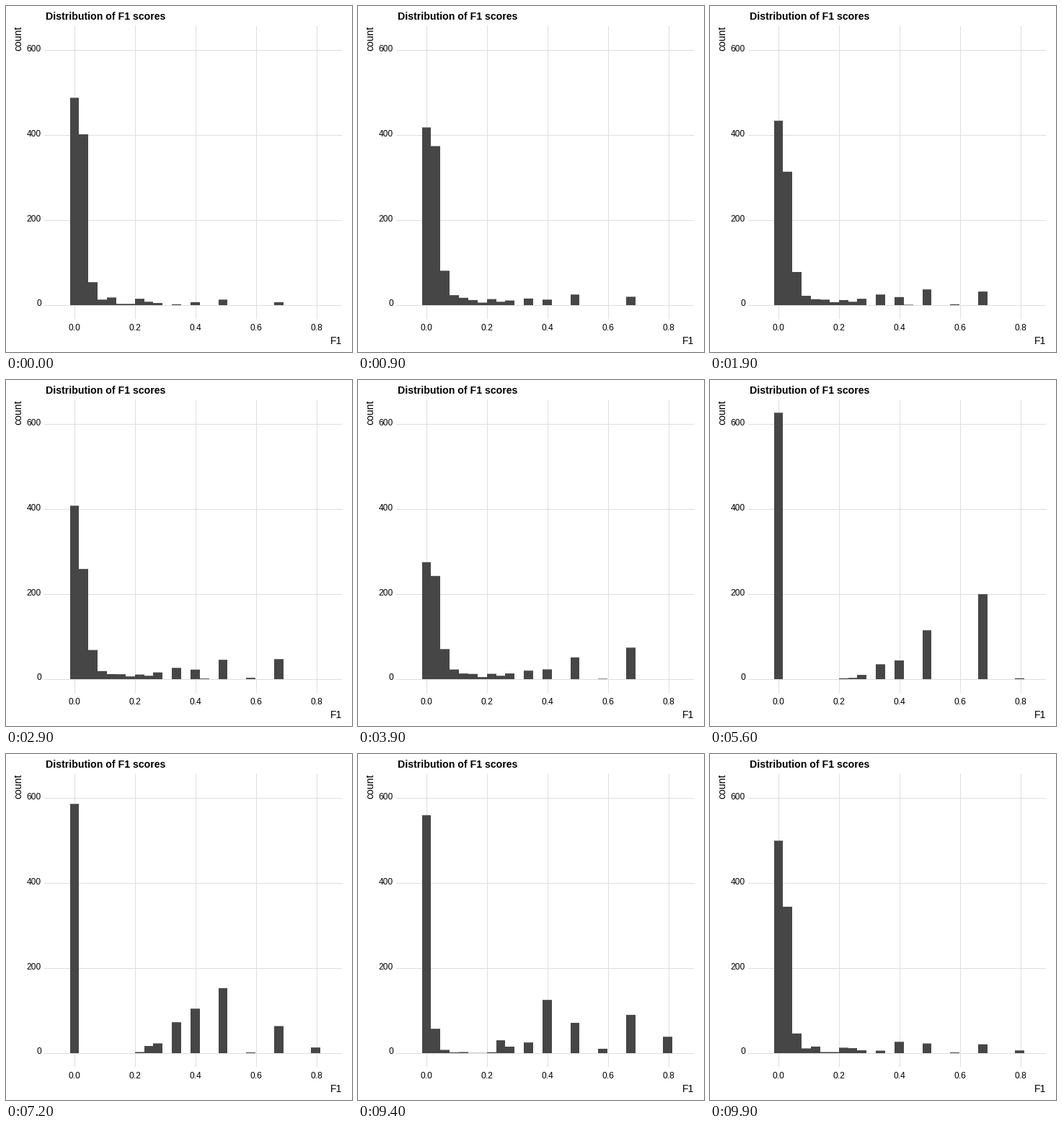
Write a matplotlib script that moves like this. It is 480 px wide and 480 px high and loops after 10000 ms.

```python
import numpy as np
import matplotlib.pyplot as plt
from matplotlib.animation import FuncAnimation
from matplotlib.patches import Rectangle

SIZE, DPI = 480, 80
FRAMES, INTERVAL = 100, 100
BAR, GRID = "#464646", "#dedede"

# Panel geometry in pixels
LEFT, RIGHT, TOP, BOTTOM = 52, 466, 26.5, 433.5
BASE, PX_PER_COUNT = 415, 0.5895
ZERO_X, PX_PER_UNIT = 94.9, 419.5
BIN_LEFT, BIN_WIDTH = 88.52, 12.88

# Occupied bins and their counts in each state
BINS = [0, 1, 2, 3, 4, 5, 6, 7, 8, 9, 11, 13, 14, 16, 19, 22, 26]
STATES = np.array([
    [488, 402, 54, 13, 18, 3, 3, 15, 8, 5, 2, 7, 0, 13, 0, 7, 0],
    [395, 365, 90, 27, 17, 15, 7, 14, 8, 13, 20, 15, 0, 29, 0, 24, 0],
    [473, 263, 66, 17, 11, 11, 7, 10, 8, 17, 30, 23, 2, 45, 4, 40, 0],
    [246, 250, 75, 24, 14, 13, 5, 13, 8, 13, 18, 21, 0, 47, 1, 65, 0],
    [451, 200, 45, 15, 9, 8, 4, 10, 8, 16, 32, 35, 0, 76, 1, 129, 0],
    [627, 0, 0, 0, 0, 0, 0, 2, 3, 10, 35, 44, 0, 115, 0, 200, 2],
    [589, 0, 0, 0, 0, 0, 0, 3, 14, 24, 80, 98, 0, 165, 0, 57, 8],
    [572, 0, 0, 0, 0, 0, 0, 0, 34, 17, 29, 145, 0, 81, 12, 104, 45],
])

# Each state holds between a pair of knots and moves linearly to the next
KNOTS = [0, 3, 11, 15, 23, 27, 34, 38, 45, 49, 56, 60, 67, 71, 78, 93, 100]
KNOT_STATES = [0, 0, 1, 1, 2, 2, 3, 3, 4, 4, 5, 5, 6, 6, 7, 7, 8]

plt.rcParams["font.family"] = "Liberation Sans"
fig = plt.figure(figsize=(SIZE / DPI, SIZE / DPI), dpi=DPI, facecolor="white")
ax = fig.add_axes([0, 0, 1, 1])
ax.set_xlim(0, SIZE)
ax.set_ylim(SIZE, 0)
ax.axis("off")


def label(x, y, text, px, **kw):
    ax.text(x, y, text, fontsize=px * 72 / DPI, color="black",
            **{"va": "baseline", **kw})


def grid_line(xs, ys):
    ax.plot(xs, ys, color=GRID, lw=72 / DPI, solid_capstyle="butt", zorder=1)


def draw_axes():
    for count in (0, 200, 400, 600):
        y = BASE - 0.2 - count * PX_PER_COUNT
        grid_line([LEFT, RIGHT], [y, y])
        label(49, y + 1.7, str(count), 12, ha="right")
    for score in (0.0, 0.2, 0.4, 0.6, 0.8):
        x = ZERO_X + score * PX_PER_UNIT
        grid_line([x, x], [TOP, BOTTOM])
        label(x, 450, f"{score:.1f}", 12, ha="center")
    label(55, 19, "Distribution of F1 scores", 14.2, weight="bold")
    label(RIGHT, 469, "F1", 14, ha="right")
    label(21, 27, "count", 14, rotation=90, ha="right", va="top",
          rotation_mode="anchor") if False else label(
        10, 27, "count", 14, rotation=90, ha="left", va="top")


def make_bar(index):
    x0 = round(BIN_LEFT + index * BIN_WIDTH)
    x1 = round(BIN_LEFT + (index + 1) * BIN_WIDTH)
    bar = Rectangle((x0, BASE), x1 - x0, 0, facecolor=BAR, lw=0,
                    snap=False, zorder=2)
    return ax.add_patch(bar)


def counts_at(frame):
    pos = np.interp(frame, KNOTS, KNOT_STATES)
    i = int(pos)
    t = pos - i
    return (1 - t) * STATES[i] + t * STATES[(i + 1) % len(STATES)]


def update(frame):
    for bar, count in zip(bars, counts_at(frame)):
        bar.set_height(-count * PX_PER_COUNT)
    return bars


draw_axes()
bars = [make_bar(i) for i in BINS]
anim = FuncAnimation(fig, update, frames=FRAMES, interval=INTERVAL,
                     repeat=True, repeat_delay=0, blit=False)
plt.show()
```
